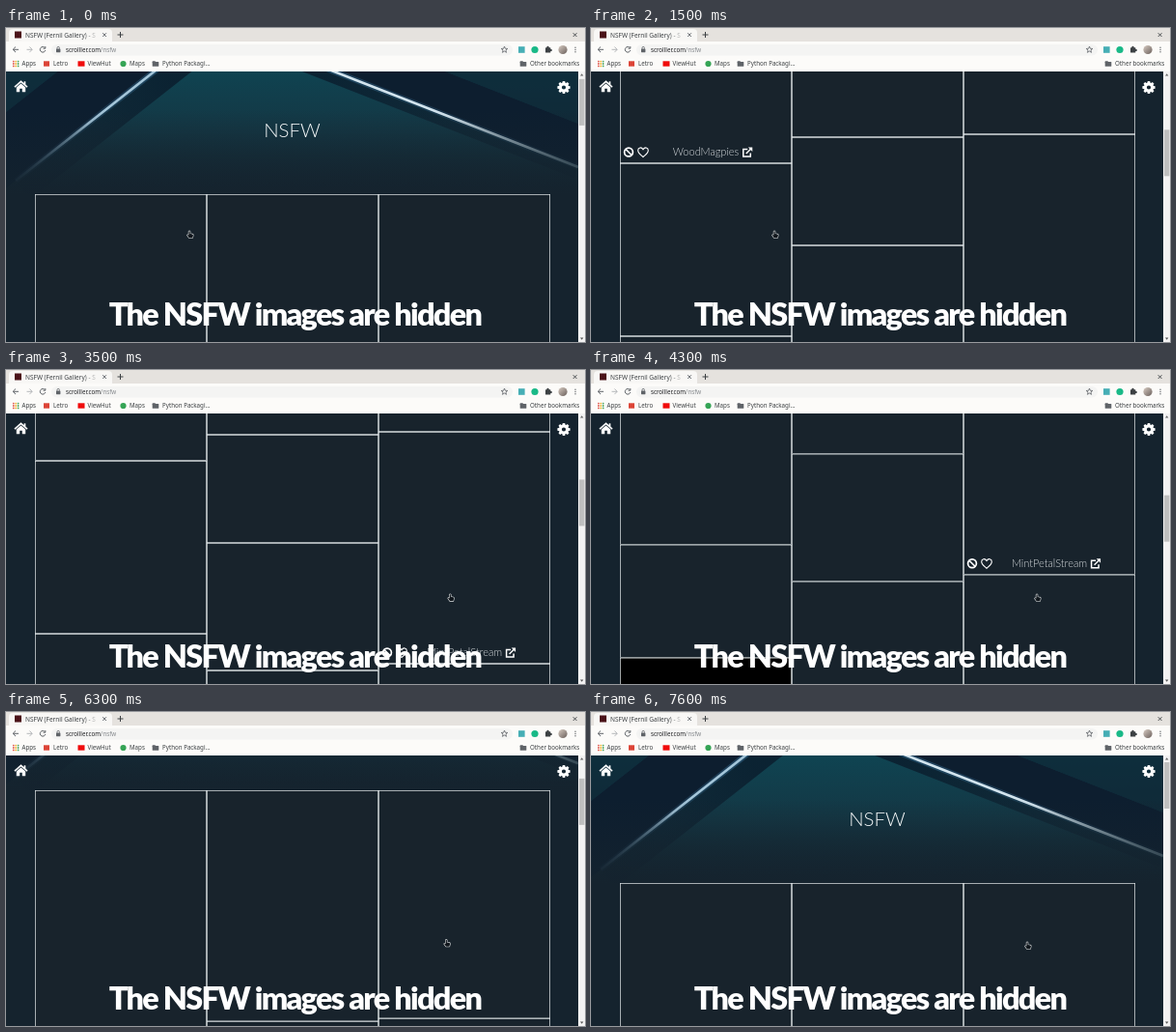
Recreate the animation shown at these times as an HTML page with a canvas. Size 600x325 px, loop 8 s.

```html
<!DOCTYPE html>
<html lang="en">
<head>
<meta charset="utf-8">
<title>Gallery scroll</title>
<style>
html, body { margin: 0; width: 100%; height: 100%; overflow: hidden; background: #15232e; }
canvas { display: block; width: 600px; height: 325px; }
</style>
</head>
<body>
<canvas id="stage"></canvas>
<script>
const W = 600, H = 325, TOP = 45, RIGHT = 593, LOOP = 8000, STEP = 100;
const canvas = document.getElementById('stage');
const ctx = canvas.getContext('2d');
const dpr = window.devicePixelRatio || 1;
canvas.width = W * dpr;
canvas.height = H * dpr;

const UI = '"Noto Sans", "Open Sans", sans-serif';
const THIN = 'Lato, "Open Sans", sans-serif';
const INK = '#3c4043', GREY = '#5f6368', WHITE = '#fff';

// Gallery: three columns of stacked items.
const GRID = { x: 30, y: 177, w: 178 };
const HEIGHTS = [[266, 179, 117, 220], [239, 112, 132, 200], [236, 240, 240]];
const NAMES = ['WoodMagpies', 'CopperMeadows', 'MintPetalStream'];
const items = HEIGHTS.flatMap((col, c) => {
  let y = GRID.y;
  return col.map((h, i) => {
    const item = { x: GRID.x + c * GRID.w, y, h, name: NAMES[c], empty: c === 0 && i === 3 };
    y += h;
    return item;
  });
});

const SCROLL_FROM = 5;
const SCROLLS = [
  { from: 0, to: 1300, y: 303 },
  { from: 1900, to: 2400, y: 349 },
  { from: 3700, to: 4500, y: 472 },
  { from: 4700, to: 5100, y: 383 },
  { from: 5400, to: 6600, y: 0 }
];
const HOVER_LAG = 250;

const clamp = v => Math.max(0, Math.min(1, v));
const phase = (t, from, to) => clamp((t - from) / (to - from));
const smooth = p => p * p * (3 - 2 * p);
const mix = (a, b, p) => a + (b - a) * p;

function scrollAt(t) {
  return SCROLLS.reduce((y, m) => mix(y, m.y, phase(t, m.from, m.to)), SCROLL_FROM);
}

function pointerAt(t) {
  const across = smooth(phase(t, 1500, 3600)), drift = phase(t, 4500, 7600);
  return { x: 191 + 272 * across - 10 * drift, y: 214 + 22 * across + 6 * drift };
}

// The hovered item stays the same until scrolling has settled.
function hoveredAt(t) {
  const move = SCROLLS.find(m => t >= m.from && t < m.to + HOVER_LAG);
  const since = move ? move.from : t;
  const p = pointerAt(since), y = p.y + scrollAt(since);
  return items.find(i => p.x >= i.x && p.x < i.x + GRID.w && y >= i.y && y < i.y + i.h);
}

function box(x, y, w, h, color) {
  ctx.fillStyle = color;
  ctx.fillRect(x, y, w, h);
}

function pill(x, y, w, h, r, color) {
  ctx.beginPath();
  ctx.roundRect(x, y, w, h, r);
  ctx.fillStyle = color;
  ctx.fill();
}

function dot(x, y, r, color) {
  ctx.beginPath();
  ctx.arc(x, y, r, 0, Math.PI * 2);
  ctx.fillStyle = color;
  ctx.fill();
}

function line(d, color, width = 1) {
  ctx.strokeStyle = color;
  ctx.lineWidth = width;
  ctx.stroke(new Path2D(d));
}

function shape(d, color) {
  ctx.fillStyle = color;
  ctx.fill(new Path2D(d));
}

function text(str, x, y, font, color, align = 'left') {
  ctx.font = font;
  ctx.fillStyle = color;
  ctx.textAlign = align;
  ctx.fillText(str, x, y);
}

function fade(x0, y0, x1, y1, ...colors) {
  const g = ctx.createLinearGradient(x0, y0, x1, y1);
  colors.forEach((c, i) => g.addColorStop(i / (colors.length - 1), c));
  return g;
}

function at(x, y, draw) {
  ctx.save();
  ctx.translate(x, y);
  draw();
  ctx.restore();
}

// A light strip along a dark wall; local -y is the outer side.
function beam(x0, y0, x1, y1, side, outer, inner, bright, dim) {
  const len = Math.hypot(x1 - x0, y1 - y0);
  at(x0, y0, () => {
    ctx.rotate(Math.atan2(y1 - y0, x1 - x0));
    ctx.scale(1, side);
    box(-90, -outer - 150, len + 180, 150, 'rgba(14,32,48,.6)');
    box(-90, -outer, len + 180, outer, '#0d1e2f');
    box(-90, 0, len + 90, inner, fade(0, 0, len, 0, 'rgba(10,27,43,.8)', 'rgba(16,32,46,.4)'));
    box(-20, -3, len + 20, 6, fade(0, 0, len, 0, 'rgba(60,125,170,.4)', 'rgba(50,90,120,.1)'));
    box(-20, -1.3, len + 20, 2.6, fade(0, 0, len, 0, bright, bright, dim));
  });
}

function drawHero() {
  box(0, 0, W, GRID.y, fade(0, TOP, 0, GRID.y, '#0f4452', '#143744', '#15232e'));
  // Each wall keeps to its own half of the page.
  for (const left of [true, false]) {
    ctx.save();
    ctx.beginPath();
    ctx.rect(left ? 0 : 250, 0, left ? 250 : W, GRID.y);
    ctx.clip();
    if (left) beam(160, 45, 10, 163, -1, 62, 24, '#a4c6da', 'rgba(75,105,125,.2)');
    else beam(327, 45, RIGHT, 149, 1, 42, 12, '#d2e4ee', '#5d7682');
    ctx.restore();
  }
  box(0, 90, W, 90, fade(0, 90, 0, GRID.y, 'rgba(21,35,46,0)', 'rgba(21,35,46,.8)'));
  text('NSFW', 296.5, 118.3, '300 20.4px ' + THIN, '#f4f7f8', 'center');
}

function drawItem({ x, y, h, empty }) {
  box(x, y, GRID.w, h, empty ? '#000' : '#18232c');
  ctx.strokeStyle = '#e4eaec';
  ctx.lineWidth = 0.7;
  ctx.strokeRect(x + 0.35, y + 0.35, GRID.w - 0.7, h - 0.7);
}

function drawLabel(item) {
  const mid = item.x + GRID.w / 2, y = item.y + item.h - 11.5;
  text(item.name, mid, y + 3.5, '300 11px ' + THIN, '#d5dadd', 'center');
  const right = mid + ctx.measureText(item.name).width / 2;
  at(item.x + 9, y, () => {
    line('M4.4 0A4.4 4.4 0 1 1-4.4 0A4.4 4.4 0 1 1 4.4 0M-3-3L3 3', WHITE, 1.7);
  });
  at(item.x + 24, y, () => {
    line('M0 5C-2 3-5.3 1-5.3-1.8C-5.3-5-1.6-5.6 0-2.8C1.6-5.6 5.3-5 5.3-1.8C5.3 1 2 3 0 5Z', WHITE, 1.1);
  });
  at(right + 9, y, () => {
    line('M0-3H-4.5V4.5H3V1M-1.5 1.5L4-4', WHITE, 1.5);
    shape('M.6-5H5V-.6Z', WHITE);
  });
}

function drawPage(t, scroll) {
  ctx.save();
  ctx.beginPath();
  ctx.rect(0, TOP, RIGHT, H - TOP);
  ctx.clip();
  box(0, TOP, W, H, '#15232e');
  ctx.translate(0, -scroll);
  drawHero();
  items.forEach(drawItem);
  const hovered = hoveredAt(t);
  if (hovered) drawLabel(hovered);
  ctx.restore();
}

function drawHome() {
  at(15.5, 60.7, () => {
    line('M-6.5 .4L0-5.4L6.5 .4', WHITE, 1.7);
    shape('M-4.7 .8L0-3.3L4.7 .8V5.5H1.3V2H-1.3V5.5H-4.7Z', WHITE);
    box(3.1, -5.4, 1.7, 3.5, WHITE);
  });
}

function drawGear() {
  at(578, 61.5, () => {
    for (let i = 0; i < 8; i++) {
      ctx.rotate(Math.PI / 4);
      shape('M-1.7-4L-1.2-6.6H1.2L1.7-4Z', WHITE);
    }
    ctx.beginPath();
    ctx.arc(0, 0, 5, 0, Math.PI * 2);
    ctx.arc(0, 0, 2.1, 0, Math.PI * 2, true);
    ctx.fillStyle = WHITE;
    ctx.fill();
  });
}

function drawScrollbar(scroll) {
  box(RIGHT, TOP, W - RIGHT, H - TOP, '#f3f2f2');
  box(594, 52 + scroll * 0.176, 5.4, 48, '#bfbfbf');
  shape('M595 49.5H598.4L596.7 47.2Z', '#666');
  shape('M595 320.5H598.4L596.7 322.8Z', '#555');
}

function folder(x) {
  pill(x - 3.3, 34.3, 3.2, 2, 0.5, GREY);
  pill(x - 3.3, 35, 6.6, 4.8, 0.6, GREY);
}

function star(x, y) {
  ctx.beginPath();
  for (let i = 0; i < 10; i++) {
    const r = i % 2 ? 1.5 : 3.5, a = i * Math.PI / 5 - Math.PI / 2;
    ctx.lineTo(x + r * Math.cos(a), y + r * Math.sin(a));
  }
  ctx.closePath();
  ctx.strokeStyle = GREY;
  ctx.lineWidth = 0.8;
  ctx.stroke();
}

function drawTabs() {
  box(0, 0, W, 15, '#e5e2de');
  pill(3, 1, 107, 16, [4, 4, 0, 0], '#f8f7f5');
  box(0, 14, W, 31, '#fcfbf9');
  box(9, 3.5, 7, 7, '#4b1219');
  text('NSFW (Fernil Gallery) - S', 20, 9.6, '6.5px ' + UI, fade(80, 0, 97, 0, INK, 'rgba(60,64,67,0)'));
  line('M100.2 5.2L104 9M104 5.2L100.2 9', GREY, 0.9);
  line('M115.5 7H121.5M118.5 4V10', INK);
  line('M587.7 5.2L591.5 9M591.5 5.2L587.7 9', INK, 0.9);
}

function drawAddressBar() {
  const font = '6.2px ' + UI, host = 'scrolller.com';
  line('M13 22.3H7.4M10 19.5L7.2 22.3L10 25.1', GREY);
  line('M21.5 22.3H27M24.4 19.5L27.2 22.3L24.4 25.1', '#b5b7b9');
  line('M40.3 20.6A2.8 2.8 0 1 0 40.8 23M40.8 19V21.2H38.5', GREY);
  pill(47, 17, 478, 11.5, 5.7, '#f4f4f3');
  pill(52, 21.5, 4.4, 3.7, 0.4, GREY);
  line('M53 21.7V20.6A1.2 1.2 0 0 1 55.4 20.6V21.7', GREY, 0.8);
  text(host, 62, 24.8, font, '#202124');
  text('/nsfw', 62 + ctx.measureText(host).width, 24.8, font, '#85898d');
  star(516.5, 22.5);
  box(531, 19.2, 6.6, 6.6, '#46aeb5');
  dot(548, 22.5, 3.6, '#19b987');
  pill(559, 20.3, 5.3, 5.2, 0.5, INK);
  dot(561.5, 20, 1.2, INK);
  dot(564.6, 22.9, 1.2, INK);
  dot(577, 22.5, 4.6, fade(573, 18, 581, 27, '#d5c9c0', '#6d625e'));
  for (let i = -1; i <= 1; i++) dot(590, 22.5 + i * 2.3, 0.7, GREY);
}

function drawBookmarks() {
  const hues = ['#e2574c', '#f2b632', '#49a45b', '#4b86e0'];
  for (let i = 0; i < 9; i++) {
    const row = Math.floor(i / 3);
    dot(7.8 + (i % 3) * 2.4, 34.6 + row * 2.4, 0.9, hues[(i + row) % 4]);
  }
  box(39, 34.3, 6, 5.4, '#dc4437');
  box(74.5, 34.3, 7, 5.4, '#f00b0b');
  dot(121.5, 37, 3.1, '#35a455');
  folder(155);
  folder(536);
  const marks = { Apps: 16.5, Letro: 49, ViewHut: 84.5, Maps: 128, 'Python Packagi...': 162, 'Other bookmarks': 543 };
  for (const name in marks) text(name, marks[name], 39.2, '6.2px ' + UI, INK);
}

function drawPointer({ x, y }) {
  at(x, y, () => {
    const hand = 'M-1.6-3.4Q-.9-4.2-.3-3.4V-1L2.2-.6Q3-.4 2.9.6L2.3 3.2H-1.2L-3.1.6Q-3-.4-1.6.5Z';
    ctx.lineJoin = 'round';
    line(hand, '#e0e3e4', 1.2);
    shape(hand, '#10161c');
  });
}

function drawCaption() {
  ctx.letterSpacing = '-1.7px';
  text('The NSFW images are hidden', 299.5, 308, '900 32.4px Lato, "Open Sans", sans-serif', WHITE, 'center');
  ctx.letterSpacing = '0px';
}

function draw(t) {
  const scroll = scrollAt(t);
  ctx.setTransform(dpr, 0, 0, dpr, 0, 0);
  drawPage(t, scroll);
  drawHome();
  drawGear();
  drawScrollbar(scroll);
  drawTabs();
  drawAddressBar();
  drawBookmarks();
  drawPointer(pointerAt(t));
  drawCaption();
}

const start = performance.now();
function tick() {
  const t = (performance.now() - start) % LOOP;
  draw(Math.floor(t / STEP) * STEP);
  requestAnimationFrame(tick);
}
tick();
</script>
</body>
</html>
```
